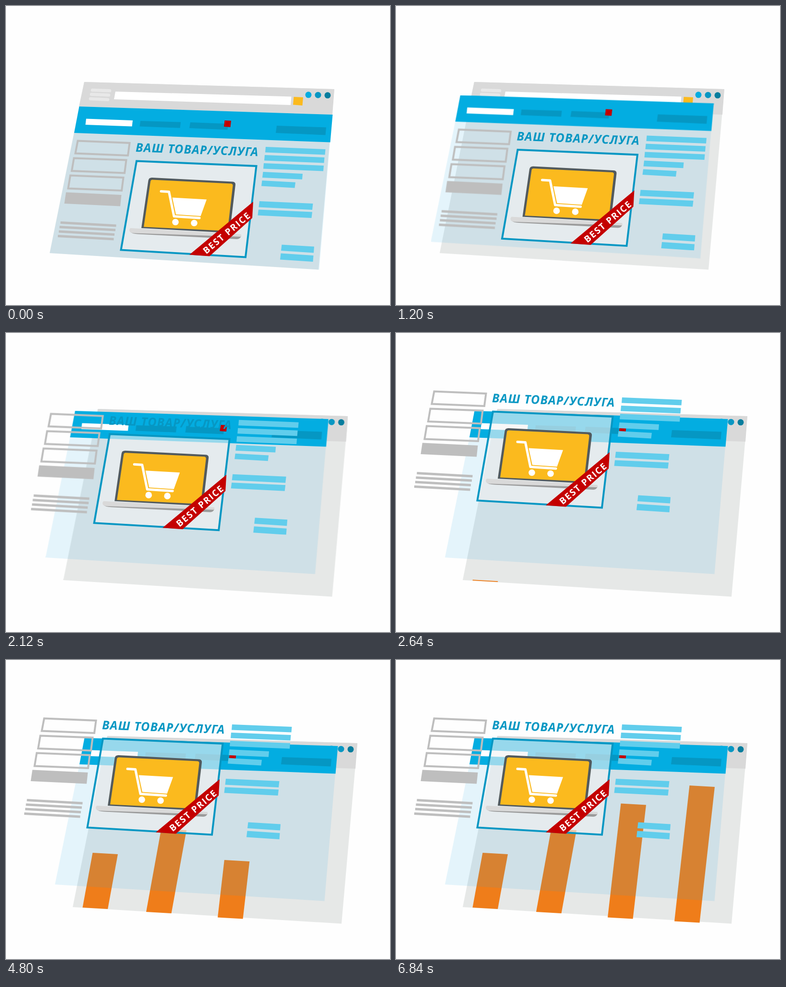
Recreate the animation shown at these times as an HTML page. Size 800 by 622 pixels, loop 9.64 s.

```html
<!DOCTYPE html>
<html lang="ru">
<head>
<meta charset="utf-8">
<title>Layered page</title>
<style>
  html, body { margin: 0; width: 100%; height: 100%; overflow: hidden; background: #fefefe; }
  svg { display: block; width: 100vw; height: 100vh; }
  text { font-family: "Open Sans", "Noto Sans", sans-serif; font-weight: 700; }
  .title { font-size: 25px; font-style: italic; letter-spacing: 1.1px; fill: #0797c3; }
  .offer { font-size: 19px; letter-spacing: 2px; fill: #fff; text-anchor: middle; }

  .layer, .bar { animation: 9640ms step-end -3ms infinite; }
  .back { animation-name: back; }
  .page { animation-name: page; }
  .front { animation-name: front; }
  .bar { fill: #ef7d1a; transform-origin: 0 0; }
  .b1 { animation-name: grow1; }
  .b2 { animation-name: grow2; }
  .b3 { animation-name: grow3; }
  .b4 { animation-name: grow4; }

  @keyframes back {
    0% { transform: none; }
    19.0871% { transform: translate(1px, 0); animation-timing-function: steps(12); }
    24.0664%, 100% { transform: translate(48px, 0); }
  }
  @keyframes page {
    0% { transform: translate(0, 0); }
    9.9585% { transform: translate(0, 0); animation-timing-function: steps(12); }
    14.9378% { transform: translate(-37px, -47px); }
    19.0871% { transform: translate(-36px, -47px); animation-timing-function: steps(12); }
    24.0664%, 100% { transform: translate(11px, -47px); }
  }
  @keyframes front {
    0% { transform: translate(0, 0); }
    9.9585% { transform: translate(0, 0); animation-timing-function: steps(12); }
    14.9378% { transform: translate(-37px, -47px); }
    19.0871% { transform: translate(-36px, -47px); animation-timing-function: steps(12); }
    24.0664%, 100% { transform: translate(-70px, -159px); }
  }
  @keyframes grow1 {
    0% { transform: scale(1, 0); }
    27.3859% { transform: scale(1, .015); animation-timing-function: steps(19); }
    35.2697%, 100% { transform: scale(1, 1); }
  }
  @keyframes grow2 {
    0% { transform: scale(1, 0); }
    36.0996% { transform: scale(1, .01); animation-timing-function: steps(19); }
    43.9834%, 100% { transform: scale(1, 1); }
  }
  @keyframes grow3 {
    0% { transform: scale(1, 0); }
    43.5685% { transform: scale(1, .008); animation-timing-function: steps(30); }
    56.0166%, 100% { transform: scale(1, 1); }
  }
  @keyframes grow4 {
    0% { transform: scale(1, 0); }
    58.5062% { transform: scale(1, .007); animation-timing-function: steps(30); }
    70.9544%, 100% { transform: scale(1, 1); }
  }
</style>
</head>
<body>
<svg viewBox="0 0 800 622">
  <!-- browser window -->
  <g class="layer back">
    <path fill="#e6e8e7" d="M163 158L684 173 651 548.5 91 514z"/>
    <path fill="#d9d9d9" d="M163 158L684 173 680 226 152 209z"/>
    <path stroke="#e8e8e8" stroke-width="6.5" stroke-linecap="round" d="M180 175L216 176.3M178 183.8L214 185.3M176 193L212 194.8"/>
    <path fill="#fff" d="M228 178L594.500 188.500 593 206 225 194z"/>
    <path fill="#fbba1e" d="M599.500 189L619 190 617.500 207 598 205.500z"/>
    <circle cx="630" cy="184.800" r="6.500" fill="#03ace0"/>
    <circle cx="650" cy="185.200" r="6.500" fill="#0797c3"/>
    <circle cx="670" cy="185.800" r="6.500" fill="#067d9d"/>
  </g>

  <!-- chart: each bar is a unit square mapped onto its slanted place -->
  <g transform="matrix(52.5 3 21 -114 159.500 515)"><rect class="bar b1" width="1" height="1"/></g>
  <g transform="matrix(52.5 3 31.500 -173 292 524)"><rect class="bar b2" width="1" height="1"/></g>
  <g transform="matrix(52.5 3 27.500 -237 441 535.500)"><rect class="bar b3" width="1" height="1"/></g>
  <g transform="matrix(52.5 3 31.500 -282.500 580 543.500)"><rect class="bar b4" width="1" height="1"/></g>

  <!-- page background and navigation -->
  <g class="layer page">
    <path fill="#28afe1" fill-opacity=".12" d="M142 264L675 283 652.500 548.500 91 514z"/>
    <path fill="#03ade1" d="M152.500 209L680.500 226 675.500 283.500 142 264z"/>
    <path fill="#fff" d="M167 234.500L264 238 262.500 250.500 165.500 247z"/>
    <path fill="#0597c3" d="M280 239L364 241.500 362.500 253.800 278.500 250.500zM384 242L463 245 461.500 257.500 382 254zM564 249L667 252.500 665.500 268.500 562 264z"/>
    <path fill="#c40000" d="M455.500 238L469 238.800 467.500 252 454 251z"/>
  </g>

  <!-- page content -->
  <g class="layer front">
    <path fill="none" stroke="#bebebe" stroke-width="4" d="M149.500 280.500L257.500 285 254 311 144.500 306.500zM141.500 316.500L250.500 320.500 247 347.500 137 343zM134 352.500L244.500 357 241 384 129.500 379.500z"/>
    <path fill="#bebebe" d="M125 387.500L240.500 393 238 416.500 121.500 411z"/>
    <path stroke="#bebebe" stroke-width="5" d="M113.500 450.500L229.500 457M111.500 459.800L228 466M110 469L226 475.500M108 478.500L224.500 485"/>

    <text class="title" transform="matrix(1 .037 0 1 270 303)">ВАШ ТОВАР/УСЛУГА</text>

    <path fill="#61cdec" d="M541 293L665.500 298 664.500 309.500 540 304.500zM539 310L663.500 315 662.500 326.500 538 321.500zM537 327L662 332 661 343.500 536 338.500zM535.500 345L618 349 617 360.800 534 357zM533.500 363L603 366.800 601.500 378.500 532 374.500zM528 406L639.500 411 638 424 526.500 418.500zM526 423.500L638 428.500 636.500 441 524.500 435.500zM574.500 496.500L642 500.500 641 513.500 573 509zM572.500 514.500L640.500 519 639.500 532 571 527.500z"/>

    <path fill="#f3f3f2" fill-opacity=".62" stroke="#0797c3" stroke-width="4" d="M272 322.500L521.500 333 499 522.500 239.500 507.500z"/>

    <!-- laptop -->
    <path fill="#525a5d" d="M304 357L472 365.500Q478.500 366 478 372L466 472 282 462 296.500 363Q297.500 357 304 357z"/>
    <path fill="#fbba1e" d="M305 361.500L469 369.500Q473 370 472.500 374L461.500 468 287 459.500 301 365Q301.500 361.500 305 361.500z"/>
    <path fill="#9b9b9b" d="M259 470L490 478Q488 485 481 485L275 474.500Q263 474 259 470z"/>
    <path fill="#d9d9d9" d="M259 462L490 475 489.500 480 266 472.500Q256 472 257 465z"/>

    <!-- cart -->
    <path fill="none" stroke="#fff" stroke-width="5" stroke-linecap="round" stroke-linejoin="round" d="M323 385.500L339.500 386.500 350 437.500 403 441"/>
    <path fill="#fff" d="M346.500 398.500L418 402.500 405.500 437 354 433.500z"/>
    <circle cx="353" cy="449.500" r="6.800" fill="#fff"/>
    <circle cx="392" cy="451.500" r="6.800" fill="#fff"/>

    <!-- ribbon -->
    <path fill="#c40000" d="M382 517.500L515 407 513 441 424 520.500z"/>
    <text class="offer" transform="translate(464.500 477) rotate(-40)">BEST PRICE</text>
  </g>
</svg>
</body>
</html>
```
